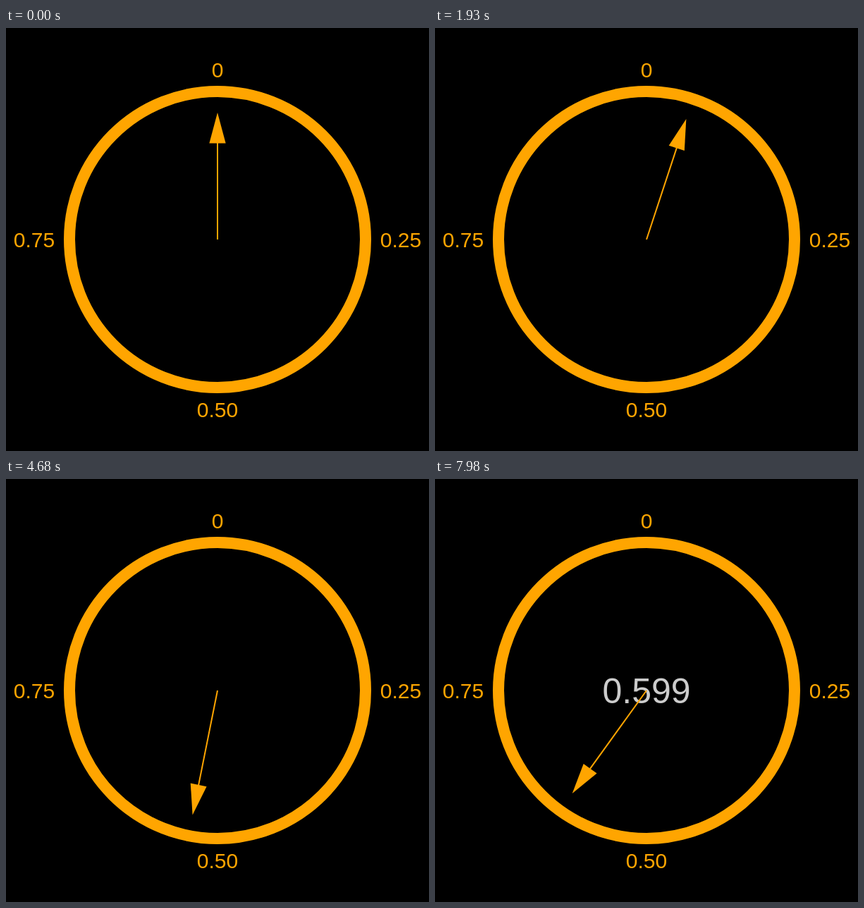
These frames come from a looping animation (600x600 px, 8 s). An HTML page:

```html
<!DOCTYPE html>
<html lang="en">
<head>
<meta charset="utf-8">
<title>Spinner</title>
<style>
  html, body { margin: 0; height: 100%; overflow: hidden; background: #000; }
  svg { display: block; width: 600px; height: 600px; }
  text { font: 30px "Liberation Sans", Arial, sans-serif; text-anchor: middle; fill: orange; }
  #value { font-size: 50px; fill: #ccc; }
</style>
</head>
<body>
<svg viewBox="0 0 600 600">
  <circle cx="300" cy="300" r="210" fill="none" stroke="orange" stroke-width="16"/>
  <text x="300" y="70">0</text>
  <text x="560" y="311">0.25</text>
  <text x="300" y="552">0.50</text>
  <text x="40" y="311">0.75</text>
  <text id="value" x="300" y="318"></text>
  <g id="arrow">
    <path d="M300 300V163" stroke="orange" stroke-width="2"/>
    <path d="M300 120L311.65 163.47H288.35Z" fill="orange"/>
  </g>
</svg>
<script>
  const LOOP = 8000, STEP = 25, SPIN = 10000, REVEAL = 5000, TURNS = 1.6;
  const arrow = document.getElementById("arrow");
  const value = document.getElementById("value");
  const easeOutQuint = u => 1 - (1 - u) ** 5;
  const start = performance.now();

  function draw() {
    const elapsed = (performance.now() - start) % LOOP;
    const time = Math.floor(elapsed / STEP) * STEP;
    const turns = TURNS * easeOutQuint(time / SPIN);
    arrow.setAttribute("transform", `rotate(${turns * 360} 300 300)`);
    value.textContent = time >= REVEAL ? (turns % 1).toFixed(3) : "";
    requestAnimationFrame(draw);
  }
  draw();
</script>
</body>
</html>
```
